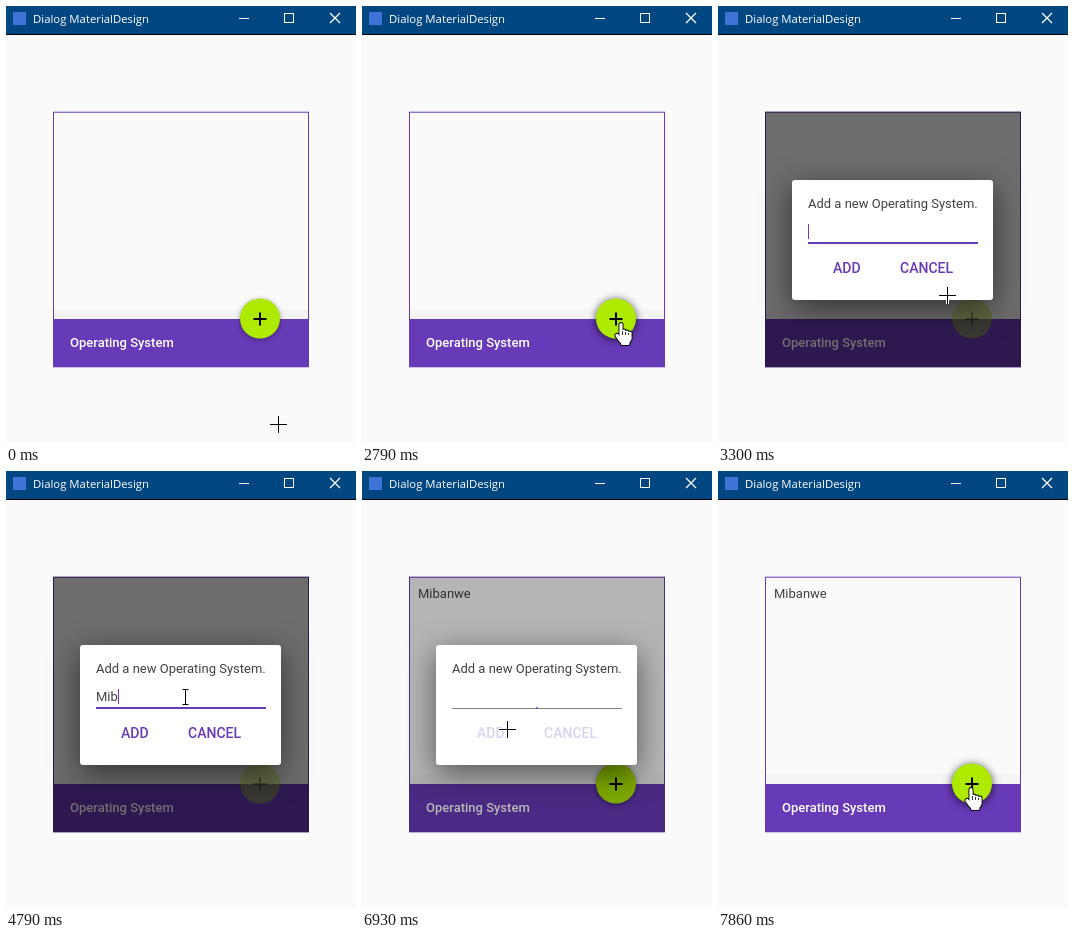
Write an HTML page with a canvas that moves like this. It is 350 px wide and 437 px high and loops after 8 s.

```html
<!DOCTYPE html>
<html lang="en">
<head>
<meta charset="utf-8">
<title>Dialog</title>
<style>
  html, body { margin: 0; width: 100%; height: 100%; overflow: hidden; background: #fafafa; }
  canvas { display: block; }
</style>
</head>
<body>
<canvas id="stage" width="350" height="437"></canvas>
<script>
const ctx = document.getElementById('stage').getContext('2d');
const LOOP = 8000, OPEN = 2820, CLOSE = 6780, FADE = 300;
const TYPE_START = 4370, KEY_DELAY = 185, BLINK = 530;
const ENTRY = 'Mibanwe';
const TYPE_END = TYPE_START + KEY_DELAY * (ENTRY.length - 1);

const PURPLE = '#673ab7', INK = 'rgba(0,0,0,.75)';
const BODY = '13px Roboto, sans-serif';
const STRONG = '500 13px Roboto, sans-serif';
const BUTTON = '500 14px Roboto, sans-serif';

const FAB = { x: 254, y: 312.5, r: 20 };
const ADD = { label: 'ADD', x: 99, y: 246, w: 59, h: 32 };
const CANCEL = { label: 'CANCEL', x: 166, y: 246, w: 86, h: 32 };
const FIELD = { x: 90, y: 217, w: 170, h: 20 };

const POINTER_START = { x: 272, y: 418 };
const POINTER_MOVES = [
  { from: 750, to: 1500, x: 259, y: 317 },
  { from: OPEN, to: 3300, x: 229, y: 289 },
  { from: 3350, to: 3940, x: 179, y: 226 },
  { from: 6230, to: 6410, x: 152, y: 255 },
  { from: CLOSE, to: 6900, x: 145, y: 258 },
  { from: 7340, to: 7860, x: 253, y: 317 }
];

function ease(t, start, end) {
  const u = Math.min(1, Math.max(0, (t - start) / (end - start)));
  return .5 - .5 * Math.cos(Math.PI * u);
}

const fade = (t, start) => ease(t, start, start + FADE);
const inside = (p, box) => p.x >= box.x && p.x <= box.x + box.w && p.y >= box.y && p.y <= box.y + box.h;

function pointerAt(t) {
  return POINTER_MOVES.reduce((p, move) => {
    const k = ease(t, move.from, move.to);
    return { x: p.x + (move.x - p.x) * k, y: p.y + (move.y - p.y) * k };
  }, POINTER_START);
}

function rect(x, y, w, h, color) {
  ctx.fillStyle = color;
  ctx.fillRect(x, y, w, h);
}

function roundRect(x, y, w, h, r, color) {
  ctx.fillStyle = color;
  ctx.beginPath();
  ctx.roundRect(x, y, w, h, r);
  ctx.fill();
}

function text(str, x, y, font, color) {
  ctx.font = font;
  ctx.fillStyle = color;
  ctx.fillText(str, x, y);
}

function lines(color, width, ...segments) {
  ctx.strokeStyle = color;
  ctx.lineWidth = width;
  ctx.beginPath();
  for (const [x1, y1, x2, y2] of segments) {
    ctx.moveTo(x1, y1);
    ctx.lineTo(x2, y2);
  }
  ctx.stroke();
}

function shadow(alpha, blur, offset) {
  ctx.shadowColor = `rgba(0,0,0,${alpha})`;
  ctx.shadowBlur = blur;
  ctx.shadowOffsetY = offset;
}

function titleBar() {
  rect(0, 0, 350, 28, '#004680');
  rect(0, 28, 350, 1, '#000');
  rect(7, 6, 13, 13, '#3f74d6');
  text('Dialog MaterialDesign', 27, 17, '11.35px "Open Sans", sans-serif', '#fff');
  lines('#fff', 1, [233, 12.5, 243, 12.5]);
  ctx.strokeRect(278.5, 7.5, 9, 9);
  lines('#fff', 1.3, [324, 7, 334, 17], [334, 7, 324, 17]);
}

function fab(enabled, hover) {
  ctx.save();
  if (enabled) shadow(hover ? .7 : .4, hover ? 8 : 5, 1);
  else ctx.globalAlpha = .38;
  ctx.fillStyle = '#aeea00';
  ctx.beginPath();
  ctx.arc(FAB.x, FAB.y, FAB.r, 0, 2 * Math.PI);
  ctx.fill();
  shadow(0, 0, 0);
  lines('#000', 2, [247.5, 313, 260.5, 313], [254, 306.5, 254, 319.5]);
  ctx.restore();
}

function panel(t, fabEnabled, fabHover) {
  rect(48, 303, 254, 10, 'rgba(0,0,0,.022)');
  rect(47, 313, 256, 48, PURPLE);
  ctx.strokeStyle = PURPLE;
  ctx.lineWidth = 1;
  ctx.strokeRect(47.5, 106.2, 255, 254.6);
  text('Operating System', 64, 341, STRONG, '#fff');
  if (t >= CLOSE) text(ENTRY, 56, 127, BODY, INK);
  fab(fabEnabled, fabHover);
  const cover = .56 * (fade(t, OPEN) - fade(t, CLOSE));
  rect(47, 105.7, 256, 255.6, `rgba(0,0,0,${cover})`);
}

function field(t) {
  const typed = t < TYPE_START || t >= CLOSE ? 0 : Math.floor((t - TYPE_START) / KEY_DELAY) + 1;
  const value = ENTRY.slice(0, typed);
  text(value, FIELD.x, 230, BODY, INK);
  const caretOn = t < OPEN + FADE + BLINK || (typed && t < TYPE_END + BLINK);
  if (caretOn) rect(Math.round(FIELD.x + ctx.measureText(value).width), 218, 1, 15, PURPLE);

  rect(FIELD.x, 237, FIELD.w, 1, '#858585');
  const focus = FIELD.w * (ease(t, OPEN + FADE, 3270) - ease(t, CLOSE, 6940));
  rect(175 - focus / 2, 236, focus, 2, PURPLE);
}

function dialog(t, pointer, active) {
  const size = fade(t, OPEN) - ease(t, 6935, 7110);
  if (size <= .01) return;
  const alpha = Math.sqrt(size);
  ctx.save();
  ctx.translate(174.5, 234);
  ctx.scale(size, size);
  ctx.translate(-174.5, -234);
  ctx.globalAlpha = alpha;

  shadow(.55, 30 * size, 8 * size);
  roundRect(74, 174, 201, 120, 3, '#fff');
  shadow(0, 0, 0);
  text('Add a new Operating System.', 90, 202, BODY, INK);
  field(t);

  for (const button of [ADD, CANCEL]) {
    ctx.globalAlpha = alpha;
    if (active && inside(pointer, button))
      roundRect(button.x, button.y, button.w, button.h, 2, '#dedede');
    ctx.globalAlpha = alpha * (t < CLOSE ? 1 : .23);
    text(button.label, button.x + 16, 267, BUTTON, PURPLE);
  }
  ctx.restore();
}

// Rounded strokes for fingers, thumb and palm: a wide black pass, then a white one.
function hand() {
  const strokes = [[0, 1.5, 0, 16], [-4, 12.5, 0, 18], [1, 18, 8, 18], [1.5, 20.5, 7, 20.5]];
  for (let i = 1; i <= 3; i++) strokes.push([3 * i, 7 + i, 3 * i, 16]);
  ctx.lineCap = 'round';
  lines('#000', 5, ...strokes);
  lines('#fff', 3.2, ...strokes);
  ctx.lineCap = 'butt';
  for (let i = 0; i < 3; i++) lines('#000', .8, [3 * i + 1.5, 8 + i, 3 * i + 1.5, 12]);
}

function cross() {
  const bars = [[-8, .5, 9, .5], [.5, -8, .5, 9]];
  lines('#fff', 3, ...bars);
  lines('#000', 1, ...bars);
}

function beam() {
  lines('#000', 1, [.5, -7, .5, 7], [-2.5, -7.5, 3.5, -7.5], [-2.5, 7.5, 3.5, 7.5]);
}

function draw(t) {
  const pointer = pointerAt(t);
  const fabEnabled = t < OPEN || t >= CLOSE;
  const fabHover = fabEnabled && Math.hypot(pointer.x - FAB.x, pointer.y - FAB.y) < FAB.r;
  const active = t >= OPEN + FADE && t < CLOSE;
  const overButton = active && [ADD, CANCEL].some(button => inside(pointer, button));
  const shape = fabHover || overButton ? hand : active && inside(pointer, FIELD) ? beam : cross;

  rect(0, 0, 350, 437, '#fafafa');
  titleBar();
  panel(t, fabEnabled, fabHover);
  dialog(t, pointer, active);

  ctx.save();
  ctx.translate(Math.round(pointer.x), Math.round(pointer.y));
  shape();
  ctx.restore();
}

function tick() {
  draw(performance.now() % LOOP);
  requestAnimationFrame(tick);
}
tick();
</script>
</body>
</html>
```
